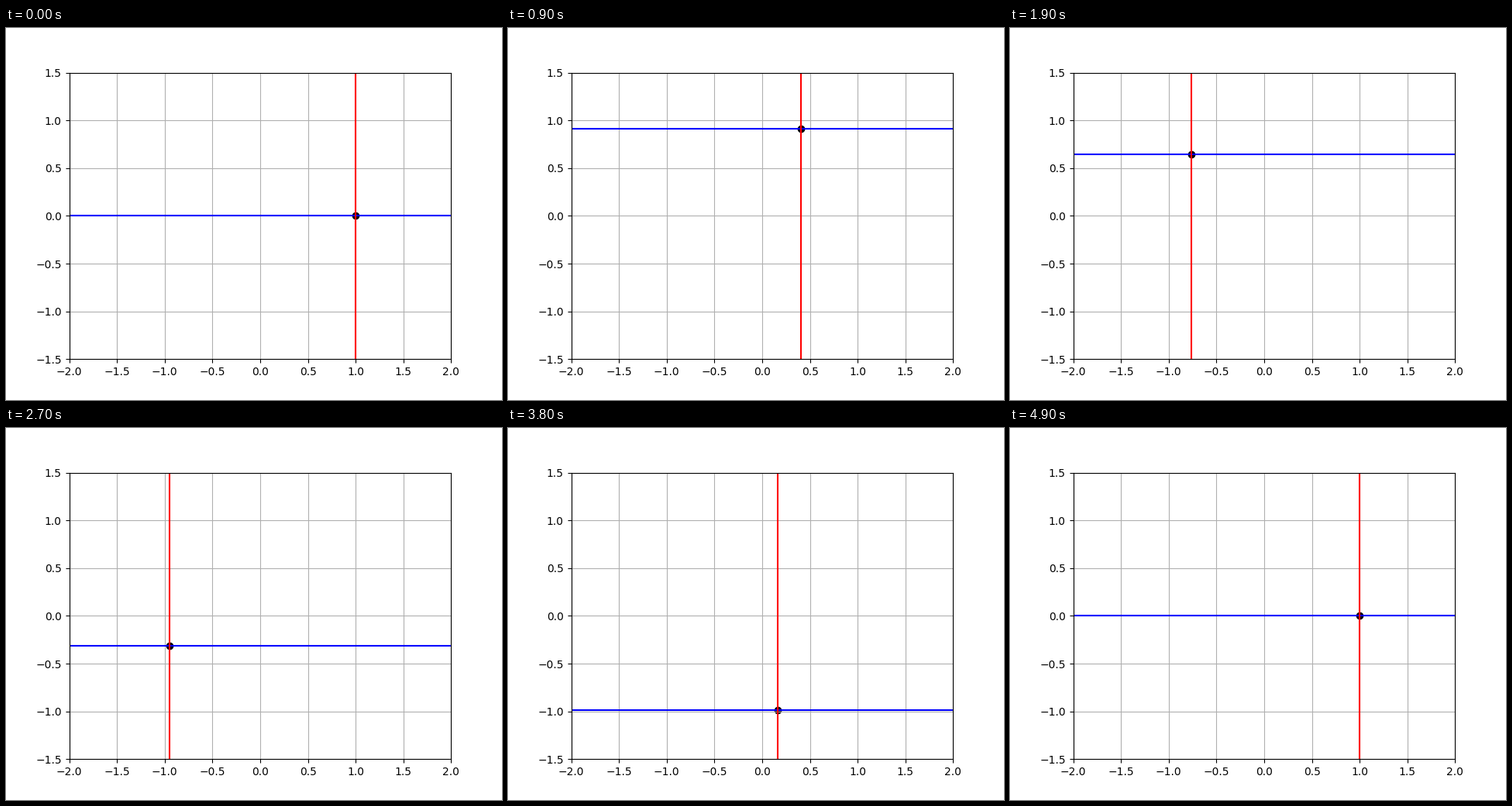
A matplotlib script that plays this animation: 640x480 px, repeating every 5 s.

```python
import numpy as np
import matplotlib.pyplot as plt
from matplotlib.animation import FuncAnimation

FRAMES = 50
INTERVAL = 100

plt.rcParams["font.family"] = "DejaVu Sans"

angles = np.linspace(0, 2 * np.pi, FRAMES)

fig, ax = plt.subplots(figsize=(6.4, 4.8), dpi=100)
ax.set_aspect("equal")
ax.set_xlim(-2, 2)
ax.set_ylim(-1.5, 1.5)
ax.grid(True)

point = ax.scatter([1], [0], color="black", s=36)
horizontal = ax.axhline(0, color="blue")
vertical = ax.axvline(1, color="red")


def update(frame):
    x, y = np.cos(angles[frame]), np.sin(angles[frame])
    point.set_offsets([[x, y]])
    horizontal.set_ydata([y, y])
    vertical.set_xdata([x, x])
    return point, horizontal, vertical


anim = FuncAnimation(fig, update, frames=FRAMES, interval=INTERVAL,
                     repeat=True, repeat_delay=0)
plt.show()
```
